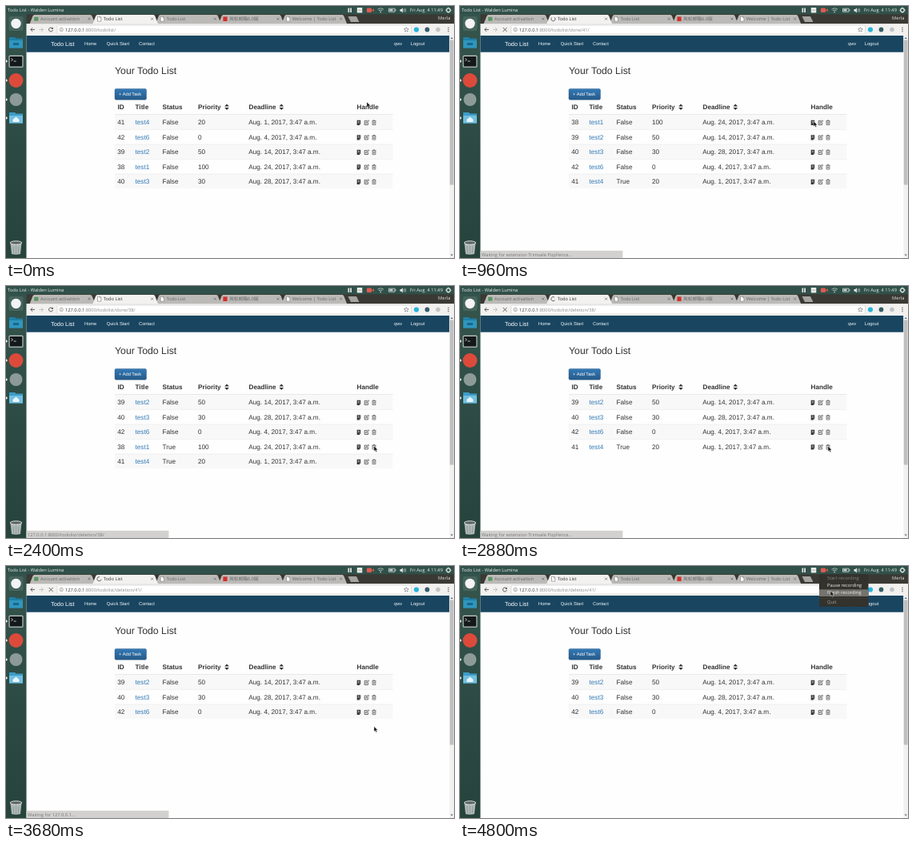
Animation of 560x315 px, one loop 4.96 s. Source, as an HTML page:

```html
<!DOCTYPE html>
<html lang="en">
<head>
<meta charset="utf-8">
<title>Todo List</title>
<style>
html, body { margin: 0; width: 100%; height: 100%; overflow: hidden; background: #fefefe }
svg { display: block }
text { white-space: pre; text-rendering: geometricPrecision }
.ui { font: 5.74px "Open Sans", "Noto Sans CJK SC", "Noto Sans CJK", sans-serif }
.page { font-family: "Liberation Sans", Arial, sans-serif }
</style>
</head>
<body>
<svg id="stage" width="560" height="315" viewBox="0 0 560 315">
  <defs>
    <linearGradient id="dock" x2="0" y2="1"><stop stop-color="#34544c"/><stop offset="1" stop-color="#26433c"/></linearGradient>
    <linearGradient id="button" x2="0" y2="1"><stop stop-color="#337ab7"/><stop offset="1" stop-color="#265a88"/></linearGradient>
  </defs>
  <g id="fixed"></g>
  <g id="live"></g>
</svg>
<script>
const STEP = 160, STEPS = 31;
const HOST = '127.0.0.1', ROOT = ':8000/todolist/';

const rect = (x, y, w, h, fill, more = '') =>
  `<rect x="${x}" y="${y}" width="${w}" height="${h}" fill="${fill}" ${more}/>`;
const disc = (x, y, r, fill) => `<circle cx="${x}" cy="${y}" r="${r}" fill="${fill}"/>`;
const shape = (d, fill) => `<path d="${d}" fill="${fill}"/>`;
const line = (d, color, w = .8) => `<path d="${d}" fill="none" stroke="${color}" stroke-width="${w}"/>`;
const ui = (x, y, s, fill, more = '') => `<text class="ui" x="${x}" y="${y}" fill="${fill}" ${more}>${s}</text>`;
const page = (x, y, s, size = 8.2, fill = '#333', more = '') =>
  `<text class="page" x="${x}" y="${y}" font-size="${size}" fill="${fill}" ${more}>${s}</text>`;
const at = (x, y, body) => `<g transform="translate(${x} ${y})">${body}</g>`;

const sheet = at(0, 0, shape('M-2-3H1L2.3-1.6V3H-2Z', '#fff') + line('M-2-3H1L2.3-1.6V3H-2ZM1-3V-1.6H2.3', '#777', .6));

function tab(i, title, icon, active) {
  const x = 29.5 + 78.7 * i, fill = active ? '#f2f1f0' : '#bcbab7';
  return shape(`M${x} 22.5L${x + 4} 12.5Q${x + 4.5} 11 ${x + 6} 11H${x + 76}Q${x + 77.5} 11 ${x + 78} 12.5L${x + 82} 22.5Z`, fill) +
    at(x + 8.3, 16.2, icon) +
    `<svg x="${x + 13.5}" y="11" width="57" height="11">${ui(0, 7.2, title, active ? '#333' : '#666')}</svg>` +
    line(`M${x + 73} 14.7l2.8 2.8m0-2.8l-2.8 2.8`, '#666', .7);
}

function launcher() {
  const folder = (y, fill) => shape(`M4 ${y - 7}H11L12.5 ${y - 5.5}H21V${y + 6.5}H4Z`, fill);
  const marks = [69, 93, 117, 140].map(y => shape(`M0 ${y - 2}L2.2 ${y}L0 ${y + 2}Z`, '#e4e9e7')).join('');
  return rect(0, 10, 25.5, 305, 'url(#dock)') +
    rect(3.5, 13, 18, 18, '#47645d', 'rx="2"') + disc(12.5, 22, 6.2, '#f4f4f4') +
    folder(46, '#1f7fa6') + rect(4, 43, 17, 9.5, '#2f96bd') + rect(9, 46, 7, 3, '#16688c') +
    rect(3.5, 61.8, 18, 15, '#c9cdca', 'rx="1.5"') + rect(4.6, 63, 15.8, 12.6, '#14191a') +
    line('M6.5 65.5l2 1.6l-2 1.6M9.7 69h3', '#eee', .8) +
    disc(12.5, 93, 9, '#dc4a3b') +
    disc(12.5, 117, 8, '#8c9b98') +
    folder(140, '#3d9cc7') + rect(4, 137, 17, 9.5, '#72bfe0') +
    shape('M8.5 142L12.5 138.5L16.5 142V145H8.5Z', '#e6f5fb') +
    shape('M5.5 296H19.5L18 310Q12.5 311.5 7 310Z', '#aeb8b5') +
    `<ellipse cx="12.5" cy="296" rx="7.2" ry="2.2" fill="#59635f" stroke="#dde3e1" stroke-width="1"/>` +
    line('M9 300l.7 9M12.5 300v9.5M16 300l-.7 9', '#87928e', .7) + marks;
}

function panel() {
  return rect(0, 0, 560, 10.3, '#30514a') +
    ui(2, 7, 'Todo List - Walden Lumina', '#eef0ec', 'font-weight="700"') +
    rect(427.5, 2.5, 1.7, 5.5, '#e8e8e3') + rect(430.3, 2.5, 1.7, 5.5, '#e8e8e3') +
    rect(438.8, 2, 6.5, 6.5, '#e8e8e3') + line('M440.5 5.2h3', '#999', .7) +
    rect(451, 2.6, 6, 5.3, '#e05a50', 'rx=".8"') + shape('M457 5.2l2.8-2v4Z', '#e05a50') +
    line('M464.5 4.2Q468.2 1.2 472 4.2M466 5.8Q468.2 4.2 470.5 5.8', '#a9b7b2', 1) + disc(468.2, 7.5, .9, '#a9b7b2') +
    line('M478.5 3.2h7.5v4h-7.5Z', '#dfe3df', .8) + rect(479.5, 4.2, 4, 2, '#dfe3df') + rect(486.4, 4.3, 1, 1.8, '#dfe3df') +
    shape('M492.5 4h1.6l2-1.8v6.4l-2-1.8h-1.6Z', '#dfe3df') + line('M497.3 3.8q1 1.5 0 3M498.8 2.8q1.8 2.5 0 5', '#dfe3df', .7) +
    ui(505, 7.2, 'Fri Aug  4 11:49', '#eef0ec') +
    `<circle cx="553" cy="5.2" r="2.3" fill="none" stroke="#e4e8e4" stroke-width="1.2"/>` +
    line('M553 1.6v1.3M553 7.6v1.3M549.4 5.2h1.3M555.4 5.2h1.3', '#e4e8e4', 1);
}

function browser() {
  return rect(25, 10, 535, 12.5, '#3a3934') +
    tab(4, 'Welcome | Todo List', sheet) +
    tab(3, '岚松邮箱6.0版', rect(-2.5, -2.8, 5.2, 5.6, '#d3302c')) +
    tab(2, 'Todo List', sheet) +
    tab(0, 'Account activation', rect(-2.6, -2.4, 5.2, 4.8, '#55965f')) +
    shape('M427.5 13H438L441.5 20H431Z', '#a5a39f') +
    ui(540, 17, 'Merla', '#e2e2de') +
    rect(25, 22.2, 535, 15, '#f2f1f0') +
    line('M36 29.5H31M33.3 27l-2.5 2.5l2.5 2.5', '#555', .9) +
    line('M41.5 29.5h5M44 27l2.5 2.5l-2.5 2.5', '#bbb', .9) +
    rect(64, 24, 442.5, 11, '#fff', 'rx="1" stroke="#c4c2bf" stroke-width=".5"') +
    `<circle cx="69.2" cy="29.5" r="2.2" fill="none" stroke="#777" stroke-width=".6"/>` + line('M69.2 29v1.8M69.2 27.9v.5', '#777', .6) +
    line('M500.5 26.6l.9 1.9l2 .2l-1.5 1.4l.4 2.1l-1.8-1.1l-1.8 1.1l.4-2.1l-1.5-1.4l2-.2Z', '#666', .6) +
    disc(513, 29.5, 3.1, '#25b4dc') + disc(526.5, 29.5, 2.9, '#355c69') + disc(540, 29.5, 2.8, '#c0c4c6') +
    [27.3, 29.5, 31.7].map(y => disc(553, y, .7, '#555')).join('');
}

function site() {
  const sorter = x => shape(`M${x - 2.8} 125.6l2.8-3l2.8 3ZM${x - 2.8} 127l2.8 3l2.8-3Z`, '#333');
  const heads = [['ID', 139.5], ['Title', 161.5], ['Status', 195.5], ['Priority', 240], ['Deadline', 303.5], ['Handle', 438.5]];
  const links = [['Home', 98], ['Quick Start', 125.7], ['Contact', 166], ['qwv', 485], ['Logout', 505.7]];
  return rect(25.5, 37, 529, 278, '#fefefe') + rect(25.5, 37, 529, 20.7, '#194560') +
    page(56, 49.8, 'Todo List', 7.4, '#fff') +
    links.map(([s, x]) => page(x, 49.2, s, 5.74, '#f4f7f9')).join('') +
    page(136, 85, 'Your Todo List', 12.3) +
    rect(136, 103.4, 39.5, 13.8, 'url(#button)', 'rx="1.6" stroke="#245580" stroke-width=".4"') +
    page(141, 112.3, '+ Add Task', 5.74, '#fff') +
    heads.map(([s, x]) => page(x, 129.3, s, 8.2, '#333', 'font-weight="700"')).join('') +
    sorter(276) + sorter(344.3) + rect(136, 135, 347.5, .8, '#ddd') +
    rect(554.3, 37, 5.7, 278, '#f1f1f1') + rect(554.8, 42.5, 4.7, 181, '#bfbfbf') +
    shape('M555.6 41l1.6-2l1.6 2ZM555.6 310.5l1.6 2l1.6-2Z', '#666');
}

const tasks = [[41, 'test4', 20, 1], [42, 'test6', 0, 4], [39, 'test2', 50, 14], [38, 'test1', 100, 24], [40, 'test3', 30, 28]];

function taskList(done, removed) {
  const rows = tasks.filter(([id]) => !removed.includes(id));
  const isDone = id => done.includes(id);
  if (done.length) rows.sort((a, b) => isDone(a[0]) - isDone(b[0]) || a[0] - b[0]);
  return rows.map(([id, name, priority, day], i) => {
    const top = 135.8 + 18.5 * i, y = top + 12.5;
    return (i % 2 ? '' : rect(136, top, 347.5, 18.5, '#f8f8f8')) + (i ? rect(136, top, 347.5, .4, '#ddd') : '') +
      page(139.3, y, id) + page(161.5, y, name, 8.2, '#337ab7') + page(195.5, y, isDone(id) ? 'True' : 'False') +
      page(240, y, priority) + page(303.3, y, `Aug. ${day}, 2017, 3:47 a.m.`) +
      at(441, top + 10, shape('M-2.3-3.1H2.2V1.5L.8 3.1H-2.3Z', '#333') + line('M-1.2-1.5h2.3M-1.2 0h2.3M.7 2.2l.8-.8', '#fff', .6)) +
      at(450.5, top + 10, line('M.6-2.2H-2.3V2.7H2V0M-.8 1l.3-1.3l2.8-2.8l.9.9L.4.6Z', '#333', .7)) +
      at(460, top + 10, line('M-2.5-2H2.5M-1-2v-.9h2V-2M-1.9-2V2.8H1.9V-2M-.7-.7V1.7M.7-.7V1.7', '#444', .65));
  }).join('');
}

// Each entry overrides the state from its step on.
const changes = [
  [0, { url: '', status: '', busy: false, done: [], removed: [], fade: 1, menu: false }],
  [4, { status: HOST + ROOT + 'done/41/' }],
  [5, { url: 'done/41/', busy: true, status: 'Waiting for 127.0.0.1...' }],
  [6, { done: [41], status: 'Waiting for extension Trimvale PopFence...' }],
  [7, { busy: false, status: HOST + ROOT + 'done/38/' }],
  [9, { url: 'done/38/', busy: true, status: 'Waiting for 127.0.0.1...' }],
  [11, { done: [41, 38], status: 'Waiting for cache...' }],
  [12, { busy: false, status: '' }],
  [15, { status: HOST + ROOT + 'deletion/38/' }],
  [17, { url: 'deletion/38/', busy: true, status: 'Waiting for 127.0.0.1...' }],
  [18, { removed: [38], status: 'Waiting for extension Trimvale PopFence...' }],
  [19, { busy: false, status: HOST + ROOT + 'deletion/41/' }],
  [22, { url: 'deletion/41/', busy: true, status: 'Waiting for 127.0.0.1...' }],
  [23, { removed: [38, 41] }],
  [24, { busy: false, status: HOST + ROOT + 'deletion/41/' }],
  [26, { fade: .25 }],
  [27, { status: '' }],
  [28, { menu: true }]
];
const route = [[0, 451, 120], [4, 442, 144], [12, 442, 144], [15, 460, 200], [23, 460, 200.5], [24, 460, 200.5], [26, 452, 5], [28, 452, 5], [30, 463, 31]];

function cursor(step) {
  const k = Math.max(1, route.findIndex(p => p[0] >= step));
  const [s0, x0, y0] = route[k - 1], [s1, x1, y1] = route[k];
  const p = (step - s0) / (s1 - s0);
  return at(x0 + (x1 - x0) * p, y0 + (y1 - y0) * p,
    '<path d="M0 0V6.6L1.5 5.2L2.5 7.6L3.7 7.1L2.7 4.8H4.7Z" fill="#111" stroke="#fff" stroke-width=".4"/>');
}

function recorderMenu() {
  const items = [['Start recording', 17.2, '#85847e'], ['Pause recording', 26.3, '#f2f2ee'], ['Finish recording', 35.4, '#f2f2ee'], ['Quit', 47, '#a5a49e']];
  return rect(449, 10.3, 61.5, 40.5, '#33322d') + rect(449, 29.3, 61.5, 8.7, '#74736e') +
    rect(449, 40, 61.5, .4, '#4c4b46') + items.map(([s, y, fill]) => ui(459, y, s, fill)).join('');
}

function draw(step) {
  const s = Object.assign({}, ...changes.filter(c => c[0] <= step).map(c => c[1]));
  const spinner = `<g transform="rotate(${step * 67})">${line('M0-2.6A2.6 2.6 0 1 1-2.6 0', '#666', .9)}</g>`;
  const reload = s.busy ? line('M53.7 27l5 5m0-5l-5 5', '#555', .9)
    : line('M58 27.9A2.5 2.5 0 1 0 58.5 30', '#555', .9) + shape('M58.9 26.4V29H56.3Z', '#555');
  document.getElementById('live').innerHTML =
    tab(1, 'Todo List', s.busy ? spinner : sheet, true) + reload +
    ui(74, 31.6, `${HOST}<tspan fill="#8a8a8a">${ROOT}${s.url}</tspan>`, '#333') +
    taskList(s.done, s.removed) +
    (s.status && `<g opacity="${s.fade}">${rect(25.5, 305.8, 178, 9.2, '#d2d1cf', 'rx="1"')}${ui(27, 312.6, s.status, '#777')}</g>`) +
    (s.menu ? recorderMenu() : '') + cursor(step);
}

document.getElementById('fixed').innerHTML = browser() + site() + launcher() + panel();

let shown = -1;
function tick() {
  const step = Math.floor(performance.now() / STEP) % STEPS;
  if (step !== shown) draw(shown = step);
  requestAnimationFrame(tick);
}
tick();
</script>
</body>
</html>
```
